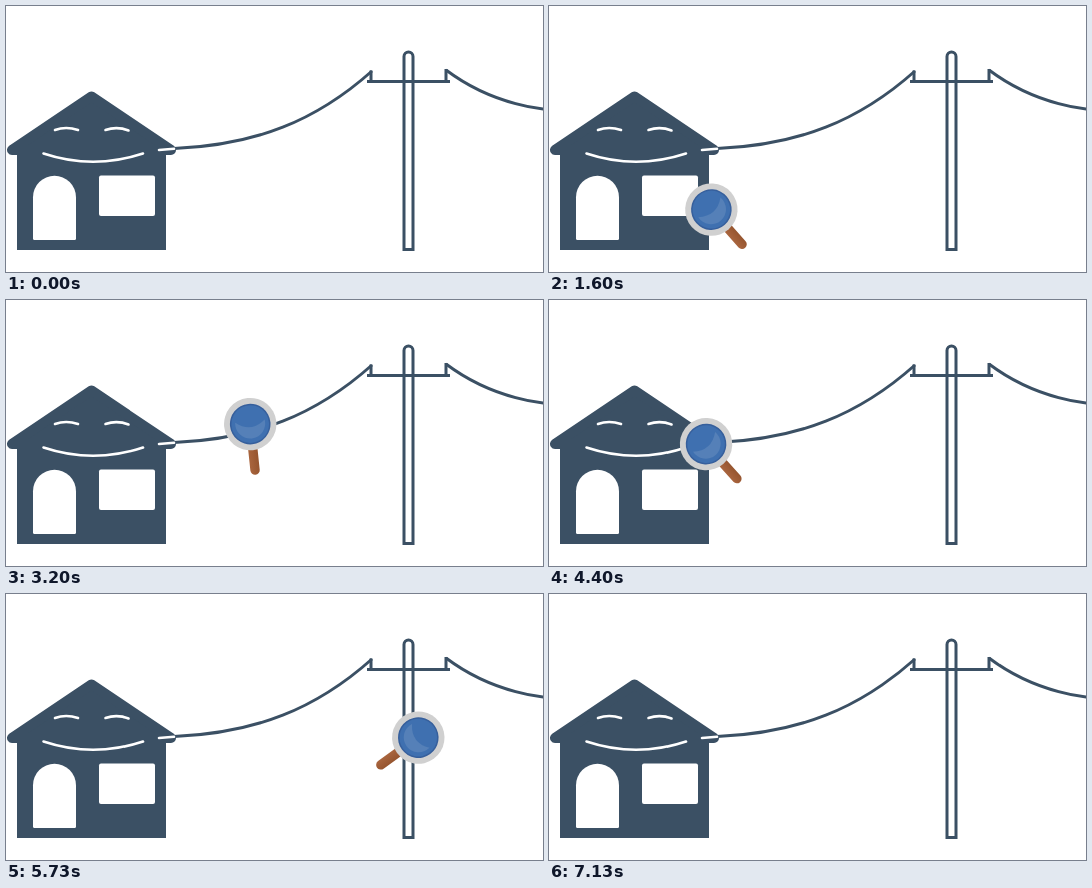
An HTML page that plays this animation: 537x266 px, repeating every 7.6 s.

```html
<!DOCTYPE html>
<html lang="en">
<head>
<meta charset="utf-8">
<title>Inspecting the line</title>
<style>
  html, body { margin: 0; width: 100%; height: 100%; overflow: hidden; background: #fff; }
  svg { display: block; width: 100%; height: 100%; }
  .ink { fill: none; stroke: #3b5064; stroke-width: 3; }
  .solid { fill: #3b5064; }
  .face { fill: none; stroke: #fff; stroke-width: 2.6; stroke-linecap: round; }
</style>
</head>
<body>
<svg viewBox="0 0 537 266">
  <defs>
    <linearGradient id="wood">
      <stop offset="0" stop-color="#a9653e"/>
      <stop offset="1" stop-color="#96552f"/>
    </linearGradient>
  </defs>

  <g id="house">
    <path class="solid" d="M11 146H160V244H11Z"/>
    <path class="solid" d="M85.5 90.5L6 144H165Z" stroke="#3b5064" stroke-width="10" stroke-linejoin="round"/>
    <path fill="#fff" d="M27 191.3a21.5 21.5 0 0 1 43 0V232.5q0 1.5 -1.5 1.5H28.5q-1.5 0 -1.5 -1.5Z"/>
    <rect fill="#fff" x="93" y="169.5" width="56" height="40.5" rx="2"/>
    <path class="face" d="M49 124Q60 120 72 124M99.5 124Q111 120 122.5 124.5M37.5 147.5Q87 164 137 147.5"/>
  </g>

  <g id="line">
    <path class="ink" d="M168 142.6C250 139 310 115 366 65"/>
    <path class="face" d="M153 144L168 142.8"/>
    <path class="ink" d="M440 64C468 85 500 98.5 540 103.5"/>
    <path class="ink" fill="#fff" style="fill:#fff" stroke-width="3.6" d="M398 243.6V50.5a4.5 4.5 0 0 1 9 0V243.6Z"/>
    <path class="ink" d="M361 75.5H444M365 75V64.5M440 75V63"/>
  </g>

  <g id="glass">
    <path fill="url(#wood)" d="M-4.7 22V46.3a4.7 4.7 0 0 0 9.4 0V22Z"/>
    <circle r="26.2" fill="#d0d0d0"/>
    <circle r="20.3" fill="#365f9c"/>
    <circle r="18.8" fill="#3f70b0"/>
    <path fill="#5580b8" d="M-14.8 -3Q0 9 14.8 -3A15 15 0 1 1 -14.8 -3Z"/>
  </g>
</svg>
<script>
  const LOOP = 7600, FPS = 15;
  const LEFT = -45, RIGHT = 54;   // handle tilt in degrees

  // Poses are [x, y, tilt]; bulge bends the path to the right of travel.
  const moves = [
    { first: 3,  steps: 8,  lead: 1,    from: [265, 293, LEFT],  to: [153, 206, LEFT],  bulge: 0 },
    { first: 24, steps: 8,  lead: 0.95, from: [153, 206, LEFT],  to: [383, 71.5, RIGHT], bulge: 20 },
    { first: 42, steps: 12, lead: 0.57, from: [383, 71.5, RIGHT], to: [149, 142, LEFT],  bulge: -10.8 },
    { first: 66, steps: 8,  lead: 0.92, from: [149, 142, LEFT],  to: [398, 172, RIGHT], bulge: 9 },
    { first: 84, steps: 7,  lead: 0.29, from: [398, 172, RIGHT], to: [403, 73, RIGHT],  bulge: 15.5 },
    { first: 98, steps: 10, lead: 1,    from: [403, 73, RIGHT],  to: [273, 295, RIGHT], bulge: 0 }
  ];

  const ease = t => 0.5 - 0.5 * Math.cos(Math.PI * t);

  function poseAt(tick) {
    const move = moves.filter(m => tick >= m.first).pop();
    if (!move) return moves[0].from;
    const { first, steps, lead, from, to, bulge } = move;
    const p = ease(Math.min(1, (tick - first + lead) / (steps - 1 + lead)));
    const dx = to[0] - from[0], dy = to[1] - from[1];
    const bend = 4 * p * (1 - p) * bulge / Math.hypot(dx, dy);
    return [
      from[0] + dx * p - dy * bend,
      from[1] + dy * p + dx * bend,
      from[2] + (to[2] - from[2]) * p
    ];
  }

  const glass = document.getElementById('glass');
  const start = performance.now();

  function draw(now) {
    const time = Math.max(0, now - start) % LOOP;
    const tick = Math.floor((time + 4) * FPS / 1000);
    const [x, y, tilt] = poseAt(tick);
    glass.setAttribute('transform', `translate(${x} ${y}) rotate(${tilt})`);
    requestAnimationFrame(draw);
  }
  draw(start);
</script>
</body>
</html>
```
